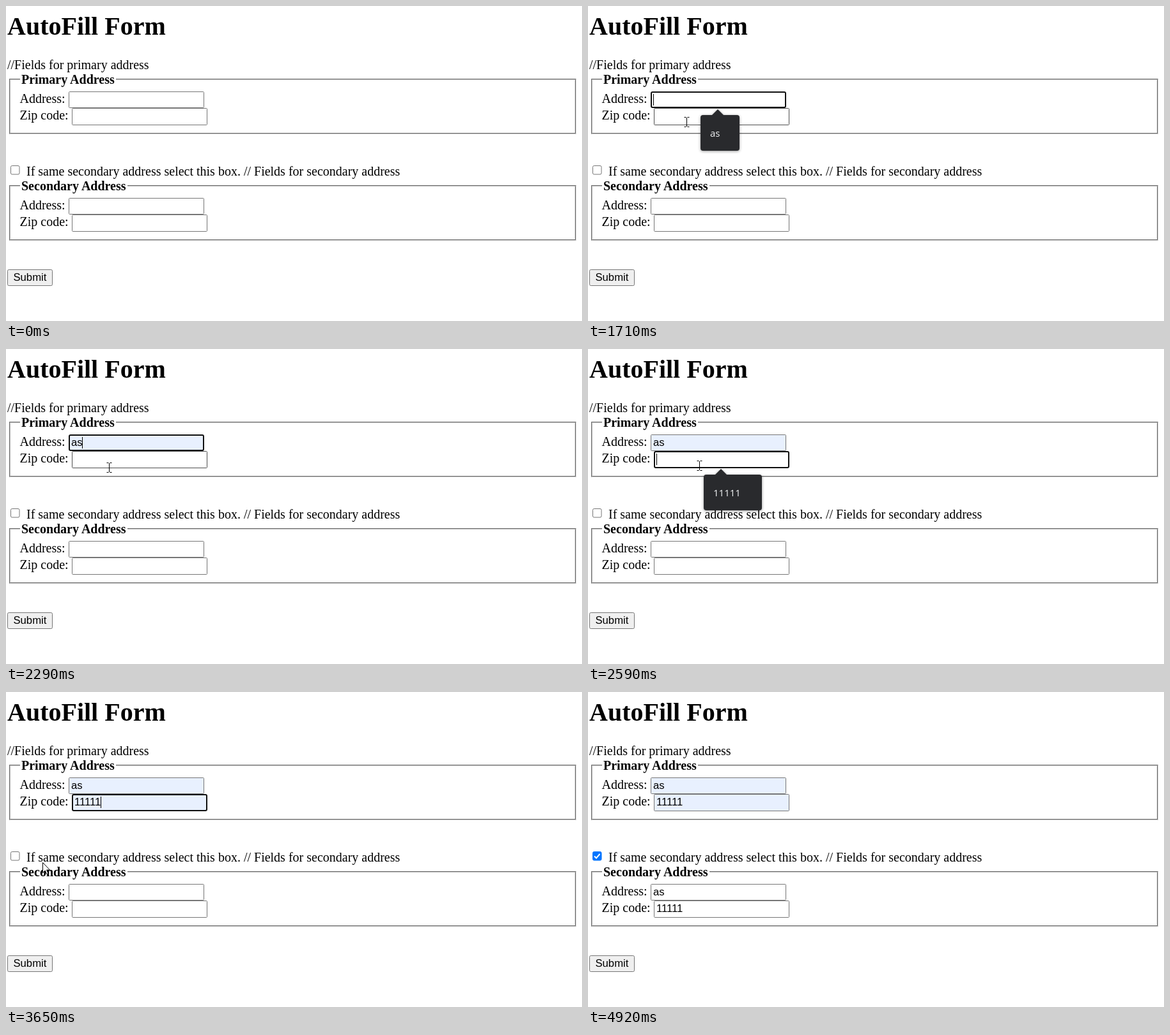
Write an HTML page that moves like this. It is 901 px wide and 494 px high and loops after 5860 ms.

```html
<!DOCTYPE html>
<html lang="en">
<head>
<meta charset="utf-8">
<title>AutoFill Form</title>
<style>
html, body { margin: 0; width: 100%; height: 100%; overflow: hidden; background: #fff; }
.set { position: absolute; left: 5px; width: 887px; height: 87px; box-sizing: border-box; border: 2px groove silver; }
svg { position: absolute; left: 0; top: 0; }
text { font: 20px "Liberation Serif", "Times New Roman", serif; white-space: pre; }
.bold { font-weight: bold; }
.ui { font: 16.667px "Liberation Sans", Arial, sans-serif; }
.tip { font: 15px "Open Sans", "Noto Sans", sans-serif; fill: #f1f3f4; }
#popup { filter: drop-shadow(0 1px 2px rgba(0, 0, 0, .4)); }
</style>
</head>
<body>
<div class="set" style="top:114px"></div>
<div class="set" style="top:281px"></div>
<svg width="901" height="494" viewBox="0 0 901 494">
  <rect x="22" y="113" width="150" height="4" fill="#fff"/>
  <rect x="22" y="280" width="168" height="4" fill="#fff"/>
  <text class="bold" x="2" y="45" style="font-size:40px">AutoFill Form</text>
  <text x="2" y="99">//Fields for primary address</text>
  <text class="bold" x="24" y="122">Primary Address</text>
  <text x="21.5" y="152">Address:</text>
  <text x="21.5" y="178">Zip code:</text>
  <text x="32" y="266">If same secondary address select this box. // Fields for secondary address</text>
  <text class="bold" x="24" y="289">Secondary Address</text>
  <text x="21.5" y="319">Address:</text>
  <text x="21.5" y="345">Zip code:</text>
  <g id="fields"></g>
  <rect id="box" x="7.5" y="250.5" width="13.5" height="13.5" rx="2"/>
  <path id="tick" d="M10 257.5l3 3 5.5-6.5" fill="none" stroke="#fff" stroke-width="2"/>
  <rect x="2.5" y="413.5" width="70" height="25" rx="2" fill="#efefef" stroke="#767676"/>
  <text class="ui" x="11.5" y="431">Submit</text>
  <g id="popup">
    <path d="M17 1L27-9 37 1z" fill="#292a2d"/>
    <rect id="panel" height="56" rx="4" fill="#292a2d"/>
    <rect id="row" y="5" height="45" fill="#3f4042"/>
    <text id="hint" class="tip" x="15" y="34"></text>
  </g>
  <g id="cursor">
    <circle id="ring" r="15" fill="#ff0" fill-opacity=".52"/>
    <path id="arrow" d="M.5.5v16l3.7-3.5 2.5 5.7 2.4-1-2.5-5.6h5z" fill="#fff" stroke="#000"/>
    <path id="beam" d="M-3.5-7.5h3M1.5-7.5h3M.5-7v14M-3.5 7.5h3M1.5 7.5h3" fill="none" stroke="#000"/>
  </g>
</svg>
<script>
const LOOP = 5860;
const $ = id => document.getElementById(id);
const set = (el, attrs) => { for (const k in attrs) el.setAttribute(k, attrs[k]); };
const show = (el, on) => set(el, { visibility: on ? "inherit" : "hidden" });
const make = (tag, attrs) => {
  const el = document.createElementNS("http://www.w3.org/2000/svg", tag);
  set(el, attrs);
  return $("fields").appendChild(el);
};

// Pointer path: tick (1/15 s), x, y
const path = [
  [3, 468, 327], [4, 318, 289], [7, 318, 289], [11, 165, 130], [14, 44, 72], [16, 115, 145],
  [17, 132, 160], [19, 138, 152], [21, 138, 152], [26, 154, 182], [29, 205, 198], [31, 205, 198],
  [34, 161, 186], [36, 164, 177], [38, 166, 177], [43, 205, 208], [46, 223, 217], [48, 223, 217],
  [52, 130, 305], [53, 95, 290], [55, 57, 267], [58, 22, 256], [61, 14, 252], [68, 14, 252],
  [71, 288, 431], [72, 288, 431], [73, 388, 433]
];
const clicks = [[19, 21], [30, 32], [36, 38], [46, 48], [62, 65]];

const fields = [[98, 134, 26], [103, 160, 27], [98, 301, 26], [103, 327, 27]].map(([x, y, h]) => ({
  x, y, h,
  rect: make("rect", {}),
  text: make("text", { class: "ui", x: x + 4, y: y + 18 }),
  caret: make("rect", { y: y + 4, width: 1, height: 18 })
}));

function pointAt(n) {
  let i = path.findIndex(p => p[0] >= n);
  if (i < 0) i = path.length - 1;
  if (i === 0) return path[0].slice(1);
  const [a, b] = [path[i - 1], path[i]];
  const k = Math.min(1, Math.max(0, (n - a[0]) / (b[0] - a[0])));
  return [1, 2].map(j => Math.round(a[j] + (b[j] - a[j]) * k));
}

function drawField(f, value, filled, focused, hover, caretOn) {
  const inset = focused ? 1 : .5;
  set(f.rect, {
    x: f.x + inset, y: f.y + inset, width: 212 - 2 * inset, height: f.h - 2 * inset,
    rx: focused ? 2 : 1, fill: filled ? "#e8f0fe" : "#fff",
    stroke: focused ? "#101010" : hover ? "#4f4f4f" : "#767676", "stroke-width": 2 * inset
  });
  if (f.text.textContent !== value) f.text.textContent = value;
  const width = value ? f.text.getComputedTextLength() : 0;
  set(f.caret, { x: Math.floor(f.x + 4 + width) });
  show(f.caret, focused && caretOn);
}

function drawPopup(n) {
  const second = n >= 38;
  const width = second ? 91 : 61;
  show($("popup"), n >= 21 && n < 32 || n >= 38 && n < 48);
  set($("popup"), { transform: second ? "translate(181 197)" : "translate(176 171)" });
  set($("panel"), { width });
  set($("row"), { width });
  show($("row"), n >= 28 && n < 32 || n >= 43 && n < 48);
  $("hint").textContent = second ? "11111" : "as";
}

function draw(t) {
  const n = Math.floor((t + 24) * .015);
  const [x, y] = pointAt(n);
  const visible = t >= 190 && t < 4920;
  const checked = t >= 4120;
  const address = n >= 28 ? "as" : "";
  const zip = n >= 43 ? "11111" : "";
  const focus = n < 20 || checked ? -1 : n < 37 ? 0 : 1;
  const caretOn = !(t > 1820 && t < 2110 || t > 3720);

  fields.forEach((f, i) => {
    const value = i < 2 || checked ? [address, zip][i % 2] : "";
    const hover = visible && x >= f.x && x < f.x + 212 && y > f.y && y <= f.y + f.h;
    drawField(f, value, i < 2 && value, focus === i, hover, caretOn);
  });

  const overBox = visible && x >= 7 && x < 22 && y >= 250 && y < 265;
  set($("box"), {
    fill: checked ? overBox ? "#005cc8" : "#0075ff" : "#fff",
    stroke: checked ? overBox ? "#005cc8" : "#0075ff" : overBox ? "#4f4f4f" : "#767676"
  });
  show($("tick"), checked);
  drawPopup(n);

  const overText = x < 316 && (y > 84 && y < 188 || y > 300 && y < 354);
  show($("cursor"), visible);
  set($("cursor"), { transform: `translate(${x} ${y})` });
  show($("arrow"), !overText);
  show($("beam"), overText);
  show($("ring"), clicks.some(([a, b]) => n >= a && n < b));
}

const start = performance.now();
function loop() {
  draw((performance.now() - start) % LOOP);
  requestAnimationFrame(loop);
}
loop();
</script>
</body>
</html>
```
